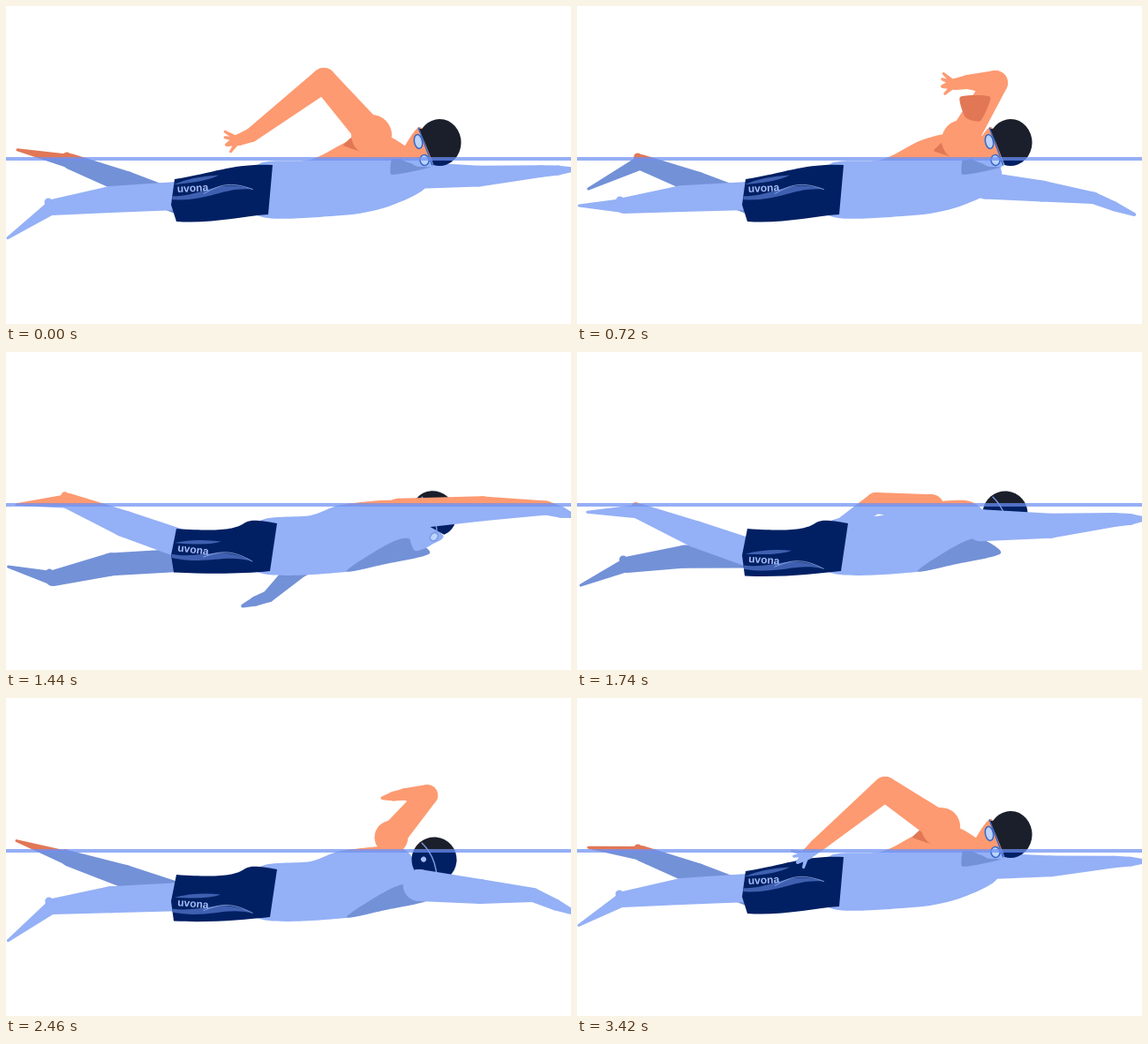
These frames come from a looping animation (640x360 px, 3.48 s). An HTML page with a canvas:

```html
<!DOCTYPE html>
<html lang="en">
<head>
<meta charset="utf-8">
<title>Freestyle swimmer</title>
<style>
html, body { margin: 0; width: 100%; height: 100%; overflow: hidden; background: #fff; }
canvas { display: block; width: 640px; height: 360px; }
</style>
</head>
<body>
<canvas id="stage" width="640" height="360"></canvas>
<script>
const ctx = document.getElementById('stage').getContext('2d');
const LOOP = 3480, STEP = 60, KICK = LOOP / 3, WATER = 173, TAU = 2 * Math.PI;
const AIR = { skin: '#fd9a71', shade: '#e27756', cap: '#1b1f2b' };
const SEA = { skin: '#94b0f6', shade: '#7391d7', cap: '#002063' };
const SHORTS = '#002063', STRIPE = '#3f60b0', PRINT = '#a5bdf8', FRAME = '#3567c4', LENS = '#bcd3fc';

// One arm stroke: time, then shoulder, elbow, wrist and fingertip
const STROKE = [
  [0, 414,146, 360,84, 278,146, 250,157],
  [420, 430,146, 436,64, 385,96, 356,108],
  [720, 436,152, 474,87, 443,86, 414,91],
  [1040, 440,162, 510,114, 575,128, 610,148],
  [1200, 442,168, 530,150, 602,156, 640,178],
  [1500, 447,187, 540,182, 612,180, 645,187],
  [2040, 470,205, 530,210, 600,201, 645,196],
  [2460, 468,212, 537,219, 597,223, 648,245],
  [2880, 400,225, 398,252, 432,326, 416,366],
  [3140, 385,228, 333,270, 300,314, 271,329],
  [3420, 412,146, 349,103, 272,167, 250,186]
];
// Torso outlines, turned to breathe and flat
const TURNED = [285,180, 345,174, 390,152, 430,146, 478,180, 474,207, 430,228, 380,237, 285,237];
const FLAT = [285,193, 345,185, 380,173, 440,168, 462,183, 462,212, 430,236, 385,249, 285,249];

const NEAR_LEG = { phase: 0, center: .37, level: .43, hip: [215, 214], knee: [219, 190],
  ankle: [228, 160], drop: 20, swing: 20, hold: 1, roll: 31, radii: [16, 15, 9] };
const FAR_LEG = { phase: .5, center: .35, level: -.42, hip: [237, 222], knee: [243, 200],
  ankle: [261, 176], drop: 5, swing: 25, hold: 0, roll: -6, radii: [13, 13, 9] };

const clamp = v => Math.max(0, Math.min(1, v));
const mix = (a, b, u) => a + (b - a) * u;
const mixAll = (a, b, u) => a.map((v, i) => mix(v, b[i], u));
const bell = (t, peak, width) => Math.exp(-(((t - peak) / width) ** 2));
function ease(t, from, to) {
  const u = clamp((t - from) / (to - from));
  return u * u * (3 - 2 * u);
}
const breath = t => 1 - ease(t, 860, 1340) + ease(t, 2900, 3380);
const sink = t => bell(t, 2080, 360);

// Periodic cubic interpolation through unevenly spaced keys
function sample(keys, time) {
  const t = (time + LOOP) % LOOP, n = keys.length;
  let i = n - 1;
  while (keys[i][0] > t) i--;
  const near = [i - 1, i, i + 1, i + 2];
  const [a, b, c, d] = near.map(j => keys[(j + n) % n]);
  const [t0, t1, t2, t3] = near.map(j => keys[(j + n) % n][0] + LOOP * Math.floor(j / n));
  const span = t2 - t1, u = (t - t1) / span, u2 = u * u, u3 = u2 * u;
  return b.map((v, k) => {
    const slopeIn = (c[k] - a[k]) / (t2 - t0) * span;
    const slopeOut = (d[k] - v) / (t3 - t1) * span;
    return mix(v, c[k], 3 * u2 - 2 * u3) + (u3 - 2 * u2 + u) * slopeIn + (u3 - u2) * slopeOut;
  }).slice(1);
}

function blob(p, color, tension = .14) {
  const n = p.length, at = i => p[(i + n) % n];
  const tangent = i => (at(i + 2) - at(i - 2)) * tension;
  ctx.beginPath();
  ctx.moveTo(p[0], p[1]);
  for (let i = 0; i < n; i += 2) {
    ctx.bezierCurveTo(at(i) + tangent(i), at(i + 1) + tangent(i + 1),
      at(i + 2) - tangent(i + 2), at(i + 3) - tangent(i + 3), at(i + 2), at(i + 3));
  }
  ctx.fillStyle = color;
  ctx.fill();
}

function disc(x, y, r) {
  ctx.beginPath();
  ctx.arc(x, y, r, 0, TAU);
  ctx.fill();
}

function capsule(x1, y1, r1, x2, y2, r2) {
  const angle = Math.atan2(y2 - y1, x2 - x1);
  const dist = Math.hypot(x2 - x1, y2 - y1) || 1;
  const lean = Math.acos(Math.max(-1, Math.min(1, (r1 - r2) / dist)));
  ctx.beginPath();
  ctx.arc(x1, y1, r1, angle + lean, angle - lean + TAU);
  ctx.arc(x2, y2, r2, angle - lean, angle + lean);
  ctx.fill();
}

function drawLeg(t, leg, color) {
  const turn = shift => Math.cos(TAU * (t / KICK + leg.phase - shift));
  const lift = .5 + .5 * Math.tanh(4 * (turn(leg.center) - leg.level));
  const roll = leg.roll * sink(t), [r1, r2, r3] = leg.radii;
  const [hip, knee, ankle] = [leg.hip, leg.knee, leg.ankle].map(y => mix(...y, lift) + roll);
  const ankleX = mix(52, 73, lift), kneeX = mix(118, 136, lift);
  const tip = ankle + (leg.drop + leg.swing * turn(.12)) * (1 - leg.hold * lift);
  ctx.fillStyle = color;
  capsule(194, hip, r1, kneeX, knee, r2);
  capsule(kneeX, knee, r2, ankleX, ankle, r3);
  capsule(ankleX, ankle, r3 - 1, mix(2, 13, lift), tip, 1.5);
  disc(ankleX - 4, ankle - 6, 4.5);
}

function nearArm(t) {
  return sample(STROKE, t);
}

// Half a stroke behind, flatter, and slower to leave the water
function farArm(t) {
  const late = LOOP / 2 - 50 + 230 * bell(t, 1850, 400);
  return sample(STROKE, t - late).map((v, i) => i % 2 ? mix(WATER, v, .75) : v);
}

function drawArm([sx, sy, ex, ey, wx, wy, tx, ty], size, color, spread) {
  const rise = clamp((WATER - ey) / 85), shoulder = 18 * size + 5 * rise, wrist = 8 * size;
  const palmX = mix(wx, tx, .5), palmY = mix(wy, ty, .5);
  ctx.fillStyle = color;
  disc(sx, sy, shoulder);
  capsule(sx, sy, shoulder * mix(1, .75, rise), ex, ey, 14 * size);
  capsule(ex, ey, 14 * size, wx, wy, wrist);
  capsule(wx, wy, wrist, palmX, palmY, wrist * .8);
  capsule(palmX, palmY, wrist * .8, tx, ty, 2);
  if (!spread) return;
  const angle = Math.atan2(ty - wy, tx - wx), reach = Math.hypot(tx - wx, ty - wy);
  for (const turn of [-.5, -.28, .3]) {
    capsule(palmX, palmY, 3, wx + Math.cos(angle - turn) * reach, wy + Math.sin(angle - turn) * reach, 1.5);
  }
}

function drawShorts(t) {
  const b = breath(t), s = sink(t), low = 249 + 11 * s;
  const flat = [193,200, 300,208, 245,182, 307,194, 299,248, 268,251, 235,low + 2, 190,low, 187,230];
  const turned = [191,196, 240,188, 258,178, 302,180, 297,236, 268,238, 230,247, 193,244, 187,225];
  const p = mixAll(flat, turned, b);
  ctx.save();
  ctx.beginPath();
  ctx.moveTo(p[0], p[1]);
  ctx.bezierCurveTo(...p.slice(2, 8));
  ctx.lineTo(p[8], p[9]);
  ctx.bezierCurveTo(...p.slice(10, 16));
  ctx.lineTo(p[16], p[17]);
  ctx.fillStyle = SHORTS;
  ctx.fill();
  ctx.clip();
  ctx.translate(194, 224 - 13 * b + 34 * s);
  ctx.rotate(mix(.13 - .13 * s, -.05, b));
  ctx.fillStyle = STRIPE;
  ctx.beginPath();
  ctx.moveTo(-4, -9);
  ctx.quadraticCurveTo(18, -17, 48, -17);
  ctx.quadraticCurveTo(34, -10, -4, -9);
  ctx.moveTo(-6, 4);
  ctx.bezierCurveTo(30, 6, 46, -14, 86, 1);
  ctx.bezierCurveTo(52, -4, 38, 12, -6, 8);
  ctx.fill();
  ctx.strokeStyle = PRINT;
  ctx.lineWidth = .7;
  ctx.beginPath();
  ctx.moveTo(30, 3);
  ctx.bezierCurveTo(48, -6, 60, -10, 86, 1);
  ctx.stroke();
  ctx.fillStyle = PRINT;
  ctx.font = 'bold 12px "Liberation Sans", Arial, sans-serif';
  ctx.fillText('uvona', 0, 0);
  ctx.restore();
}

function lens(x, y, rx, ry) {
  ctx.beginPath();
  ctx.ellipse(x, y, rx, ry, -.2, 0, TAU);
  ctx.fillStyle = LENS;
  ctx.fill();
  ctx.stroke();
}

// Drawn around the centre of the cap, rolling between breathing and looking down
function drawHead(t, tone) {
  const b = breath(t), breathing = b > .5, away = t > 1700 && t < 2700;
  ctx.save();
  ctx.translate(mix(485, 491, b), mix(183, 154.5, b));
  if (breathing) blob([-54,18, -42,17, -26,27, -10,28, -36,34, -55,36], tone === SEA ? tone.shade : tone.skin, .08);
  ctx.rotate(mix(-.7, 0, b));
  if (!away) blob([-21,-17, -38,2, -44,17, -37,22, -25,25, -8,25], tone.skin);
  ctx.beginPath();
  if (away) {
    ctx.ellipse(0, 0, 25.5, 25.5, 0, 0, TAU);
  } else {
    ctx.moveTo(-24, -16);
    ctx.ellipse(0, 0, 24.5, 26.5, 0, 3.75, 1.85 + TAU);
    ctx.quadraticCurveTo(-14, 4, -24, -16);
  }
  ctx.fillStyle = tone.cap;
  ctx.fill();
  ctx.strokeStyle = FRAME;
  ctx.lineWidth = 1.5;
  if (breathing) {
    ctx.beginPath();
    ctx.moveTo(-24, -17);
    ctx.quadraticCurveTo(-16, 4, -8, 26);
    ctx.stroke();
    lens(-24, -1, 4.5, 8);
  } else {
    ctx.fillStyle = PRINT;
    disc(-9, -8, 3);
    ctx.strokeStyle = '#7997e5';
    ctx.beginPath();
    ctx.moveTo(1.5, -24);
    ctx.quadraticCurveTo(4, -2, -11, 18);
    ctx.stroke();
  }
  if (!away) lens(-17, 20, 5, mix(4, 6, b));
  ctx.restore();
}

function drawSwimmer(t, tone) {
  const near = nearArm(t), far = farArm(t);
  const shaded = tone === SEA && t > 900 && t < 1740;
  const [sx, sy, ex, ey] = near;
  drawLeg(t, FAR_LEG, tone.shade);
  drawLeg(t, NEAR_LEG, tone.skin);
  drawArm(far, .85, shaded ? tone.shade : tone.skin, false);
  blob(mixAll(FLAT, TURNED, breath(t)), tone.skin);
  if (t > 1200 && t < 2700) blob([386,248, 428,220, 455,211, 480,228, 430,240], tone.shade);
  drawShorts(t);
  drawHead(t, tone);
  const recovering = t < 900 || t > 3350;
  if (recovering) blob([sx - 32, sy + 12, sx - 18, sy, sx, sy + 22], tone.shade, .05);
  drawArm(near, 1, tone.skin, recovering);
  if (t > 540 && t < 900) {
    blob([ex - 40, ey + 16, ex - 6, ey + 16, ex - 17, ey + 43, ex - 34, ey + 39], tone.shade, .1);
  }
}

function half(top, height, t, tone) {
  ctx.save();
  ctx.beginPath();
  ctx.rect(0, top, 640, height);
  ctx.clip();
  drawSwimmer(t, tone);
  ctx.restore();
}

function render(now) {
  const t = Math.floor(now % LOOP / STEP) * STEP;
  ctx.fillStyle = '#fff';
  ctx.fillRect(0, 0, 640, 360);
  half(0, WATER, t, AIR);
  half(WATER, 360 - WATER, t, SEA);
  ctx.fillStyle = 'rgba(108,144,243,.72)';
  ctx.fillRect(0, WATER - 2, 640, 4);
}

let start;
function loop(now) {
  start ??= now;
  render(now - start);
  requestAnimationFrame(loop);
}
render(0);
requestAnimationFrame(loop);
</script>
</body>
</html>
```
